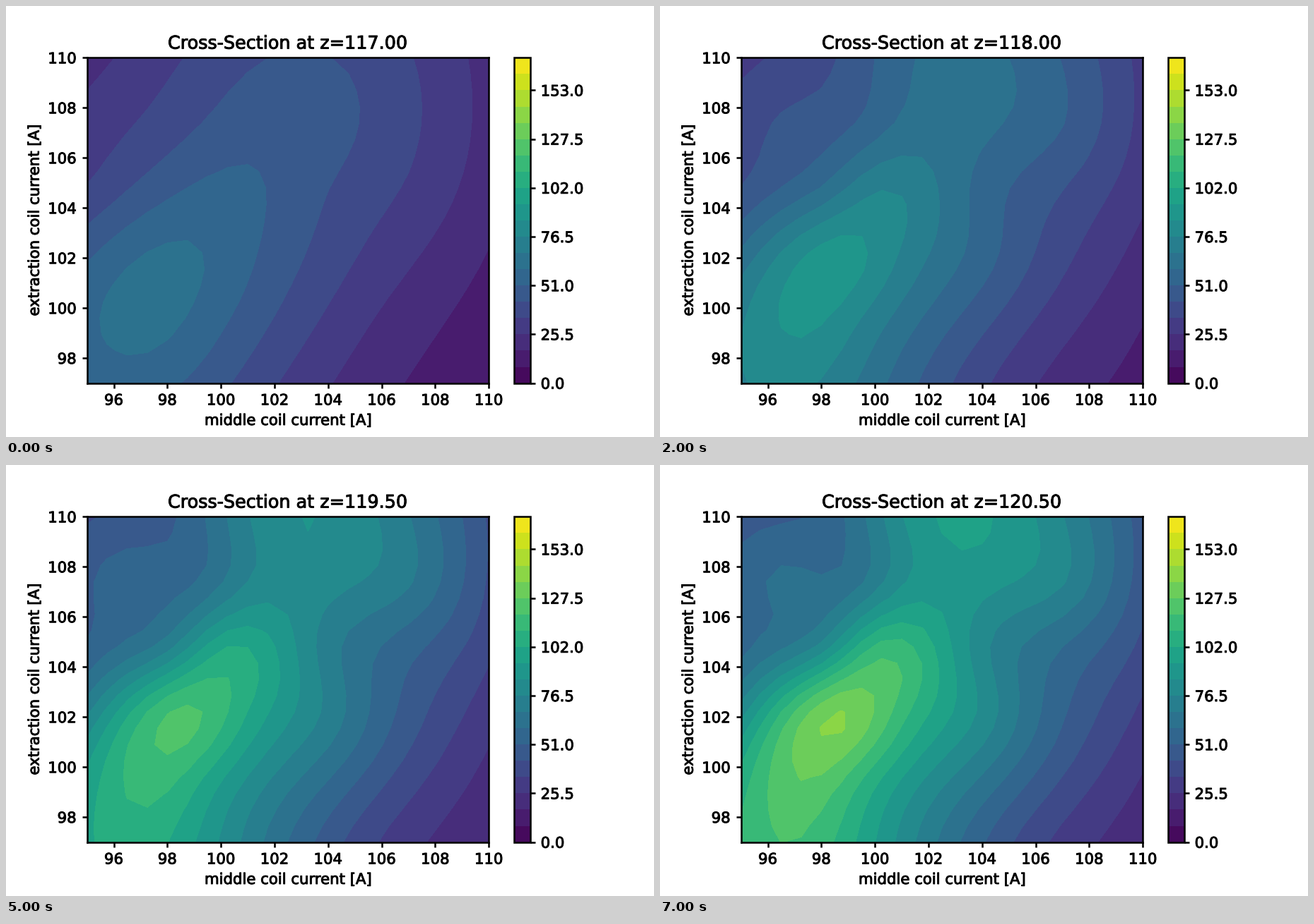
A matplotlib script that plays this animation: 917x611 px, repeating every 8 s.

```python
import numpy as np
import matplotlib.pyplot as plt
from matplotlib.patheffects import withStroke
from matplotlib.animation import FuncAnimation

W, H, DPI = 917, 611, 152.8
FRAMES = 8
N = 21                          # grid nodes per axis
EASE = 0.425                    # how strongly the growth slows down

# Key points of the surface: x, y, height at the first and last section.
KEYS = np.array([
    (95, 110, 22, 46), (98, 110, 32, 53), (101, 110, 41, 84.5),
    (107, 110, 34.7, 77), (110, 110, 22, 46),
    (95, 107.4, 28.5, 55), (96.9, 107.4, 34.2, 61.5), (99.5, 107.4, 43.2, 67),
    (102.5, 107.4, 48.5, 91), (107, 107.4, 36, 77.5), (110, 107.4, 22.5, 46),
    (95, 104.8, 34.5, 56.5), (98, 104.8, 48.5, 79), (100.2, 104.8, 53.3, 114),
    (104, 104.8, 42.7, 79), (107, 104.8, 33, 59.5), (110, 104.8, 20.5, 40),
    (95, 102.2, 49, 81), (96.5, 102.2, 57, 110.5), (98.6, 102.2, 61, 136.5),
    (101, 102.2, 52.7, 114), (104, 102.2, 38.8, 83), (110, 102.2, 16.7, 32),
    (95, 99.6, 57.5, 105), (97.2, 99.6, 63.3, 128), (99.5, 99.6, 55.5, 111.5),
    (103, 99.6, 37.3, 75.5), (106.5, 99.6, 22.7, 46),
    (95, 97, 54, 112), (98, 97, 52.8, 114.5), (101.5, 97, 37, 76.5),
    (105.5, 97, 20.8, 40), (110, 97, 10, 19),
])


def basis(points, centers):
    """Cubic radial terms plus a plane."""
    r = np.linalg.norm(points[:, None] - centers[None], axis=2)
    return r ** 3, np.column_stack([np.ones(len(points)), points - 102])


def surface(points, heights, targets):
    """Smooth surface through the key points, read at the targets."""
    radial, plane = basis(points, points)
    system = np.block([[radial, plane], [plane.T, np.zeros((3, 3))]])
    weights = np.linalg.solve(system, np.vstack([heights, np.zeros((3, 2))]))
    return np.hstack(basis(targets, points)) @ weights


xs, ys = np.linspace(95, 110, N), np.linspace(97, 110, N)
nodes = np.column_stack([g.ravel() for g in np.meshgrid(xs, ys)])
first, last = surface(KEYS[:, :2], KEYS[:, 2:], nodes).T.reshape(2, N, N)
levels = np.linspace(0, 170, 21)

plt.rcParams.update({"axes.linewidth": 1.2, "xtick.major.width": 1.2,
                     "ytick.major.width": 1.2})
fig, ax = plt.subplots(figsize=((W + 0.01) / DPI, (H + 0.01) / DPI), dpi=DPI)
fig.subplots_adjust(left=0.125, right=0.9, bottom=0.125, top=0.88)


def fill(i):
    t = i / (FRAMES - 1)
    growth = t * (1 + EASE * (1 - t))
    return ax.contourf(xs, ys, first + (last - first) * growth, levels=levels,
                       cmap="viridis", vmin=0, vmax=170)


shown = fill(0)
bar = fig.colorbar(shown, ax=ax, ticks=levels[::3], format="%.1f")
bar.outline.set_linewidth(1.2)
bar.minorticks_off()
ax.set(xlim=(95, 110), ylim=(97, 110), xticks=range(96, 111, 2),
       yticks=range(98, 111, 2), xlabel="middle coil current [A]",
       ylabel="extraction coil current [A]")

# Slightly heavy lettering
for text in [ax.title, ax.xaxis.label, ax.yaxis.label, *ax.get_xticklabels(),
             *ax.get_yticklabels(), *bar.ax.get_yticklabels()]:
    text.set_path_effects([withStroke(linewidth=0.45, foreground="black")])


def draw(i):
    global shown
    shown.remove()
    shown = fill(i)
    ax.set_title(f"Cross-Section at z={117 + 0.5 * i:.2f}")
    return []


anim = FuncAnimation(fig, draw, frames=FRAMES, interval=1000,
                     init_func=lambda: [], repeat=True, repeat_delay=0)
plt.show()
```
